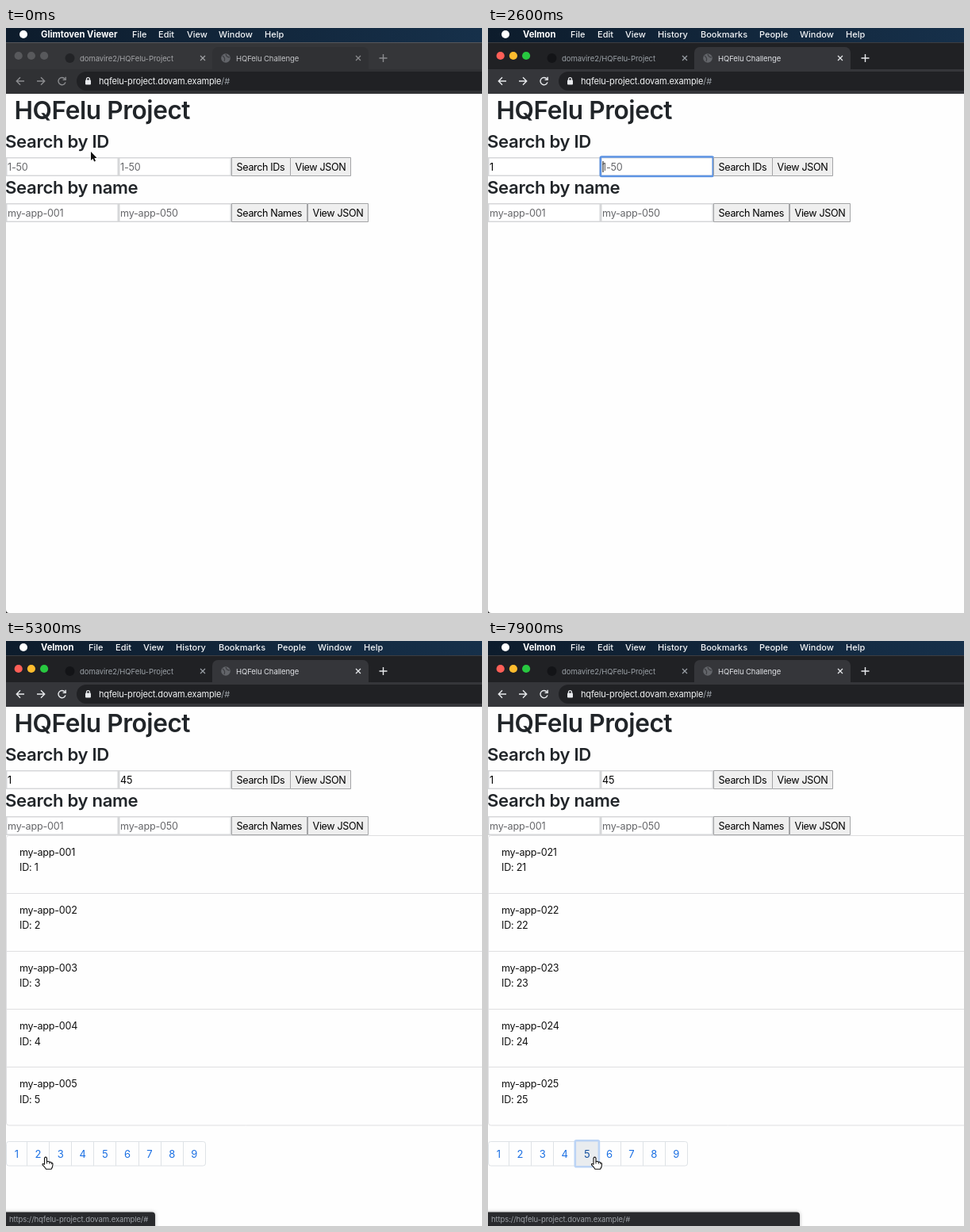
An HTML page with a canvas for the animation above (8 s loop, 600x738 px).

```html
<!DOCTYPE html>
<html lang="en">
<head>
<meta charset="utf-8">
<title>Search demo</title>
<style>
html, body { margin: 0; width: 100%; height: 100%; overflow: hidden; background: #fff; }
canvas { display: block; width: 600px; height: 738px; }
</style>
</head>
<body>
<canvas id="stage" width="600" height="738"></canvas>
<script>
const ctx = document.getElementById('stage').getContext('2d');
const LOOP = 8000, STEP = 100;
const HOST = 'hqfelu-project.dovam.example';

// [time, x, y, shape]; the shape holds until the next entry
const POINTER = [
  [0, 107, 156, 'arrow'], [100, 107, 156, 'arrow'], [300, 100, 191, 'arrow'],
  [500, 86, 177, 'beam'], [600, 85, 173, 'beam'], [1600, 85, 173, 'none'],
  [3300, 85, 173, 'beam'], [3600, 288, 177, 'hand'], [3800, 304, 180, 'hand'],
  [4000, 302, 178, 'hand'], [4300, 302, 178, 'hand'], [4400, 262, 240, 'arrow'],
  [4700, 35, 638, 'arrow'], [4900, 40, 645, 'arrow'], [5000, 42, 648, 'hand'],
  [5300, 50, 651, 'hand'], [6100, 50, 651, 'hand'], [6600, 85, 651, 'hand'],
  [6800, 85, 651, 'hand'], [7100, 104, 651, 'hand'], [7500, 104, 651, 'hand'],
  [7700, 142, 651, 'hand'], [7800, 134.5, 651, 'hand'], [LOOP, 134.5, 651, 'hand'],
];
const PAGES = [[4400, 1], [5600, 2], [6700, 3], [7300, 4], [7800, 5]];
const FIRST_VALUE = [[0, ''], [1600, '1']];
const SECOND_VALUE = [[0, ''], [3000, '4'], [3200, '45']];

const SHAPES = {
  arrow: new Path2D('M0 0V11L2.5 8.7L4.2 12.5L6 11.7L4.4 8H7.6Z'),
  beam: new Path2D('M-2.5-6Q0-6 0-4.5Q0-6 2.5-6M0-4.5V4.5M-2.5 6Q0 6 0 4.5Q0 6 2.5 6'),
  hand: new Path2D('M-1.5 1.2Q0-1 1.5 1.2V5.8Q4 5 4.8 6.4Q6.8 5.8 7.3 7.2Q9 7 9 9Q9 13 7 15.3H.5Q-1 12.5-4 9.8Q-4.4 7.6-1.5 9.3Z'),
  fingers: new Path2D('M1.5 5.8V8.5M4.8 6.4V8.8M7.3 7.2V9.2'),
};

const latest = (list, t) => list.reduce((value, [at, next]) => t >= at ? next : value, 0);

function rect(x, y, w, h, fill, radii = 0) {
  ctx.fillStyle = fill;
  ctx.beginPath();
  ctx.roundRect(x, y, w, h, radii);
  ctx.fill();
}

function frame(x, y, w, h, color, width = 1, radii = 0) {
  ctx.strokeStyle = color;
  ctx.lineWidth = width;
  ctx.beginPath();
  ctx.roundRect(x, y, w, h, radii);
  ctx.stroke();
}

function dot(x, y, r, fill) {
  ctx.fillStyle = fill;
  ctx.beginPath();
  ctx.arc(x, y, r, 0, Math.PI * 2);
  ctx.fill();
}

function stroke(path, color, width) {
  ctx.strokeStyle = color;
  ctx.lineWidth = width;
  ctx.stroke(typeof path === 'string' ? new Path2D(path) : path);
}

function text(str, x, y, size, color, { weight = 400, track = 0, align = 'left' } = {}) {
  ctx.font = `${weight} ${size}px Inter, Roboto, sans-serif`;
  ctx.letterSpacing = `${track * size}px`;
  ctx.textAlign = align;
  ctx.fillStyle = color;
  ctx.fillText(str, x, y);
  return ctx.measureText(str).width;
}

const body = (str, x, y, color = '#111', track = -.03) => text(str, x, y, 12.6, color, { track });
const heading = (str, x, y, size) => text(str, x, y, size, '#212529', { weight: 600, track: -.014 });

function menuBar(active) {
  const sky = ctx.createLinearGradient(0, 0, 600, 0);
  sky.addColorStop(0, '#0d1c2c');
  sky.addColorStop(1, '#16304a');
  rect(0, 0, 600, 18, sky);
  dot(22, 8, 5, '#fff');
  text(active ? 'Velmon' : 'Glimtoven Viewer', 44, 12, 11.2, '#fff', { weight: 700 });
  const items = active
    ? [['File', 104], ['Edit', 138], ['View', 173], ['History', 214], ['Bookmarks', 268],
       ['People', 342], ['Window', 393], ['Help', 451]]
    : [['File', 159], ['Edit', 192], ['View', 228], ['Window', 268], ['Help', 326]];
  for (const [label, x] of items) text(label, x, 12, 11, '#f4f6f8', { weight: 500 });
}

function browser(active) {
  const icon = active ? '#e8eaed' : '#8b8c8f';
  const dim = active ? '#9aa0a6' : '#a2a3a6';
  const toolbar = active ? '#35363a' : '#303134';
  rect(0, 18, 600, 34, active ? '#202124' : '#353639');
  rect(0, 18, 600, 1, active ? '#3c3d41' : '#56575b');
  rect(0, 52, 600, 31, toolbar);
  rect(260, 24, 197, 30, toolbar, [7, 7, 0, 0]);
  ['#ff5f57', '#febc2e', '#28c840'].forEach((c, i) => dot(15.7 + 16.2 * i, 35, 5.1, active ? c : '#58595c'));

  dot(80.5, 38, 6, active ? '#131417' : '#222326');
  text('domavire2/HQFelu-Project', 93, 41.5, 9.5, dim, { track: -.006 });
  dot(277, 38, 5.8, '#63656a');
  stroke('M273 35Q277 38 275 42M277 33Q278 37 282 37', '#3d3e42', 1.2);
  text('HQFelu Challenge', 290, 41.5, 9.5, active ? '#dfe1e5' : '#c3c4c7', { track: -.01 });
  stroke('M245 35l6 6m0-6l-6 6', dim, 1.2);
  stroke('M441 35l6 6m0-6l-6 6', icon, 1.2);
  stroke('M470.5 38h10M475.5 33v10', icon, 1.4);

  stroke('M23 67H13.5M18 62.3L13.3 67L18 71.7M39 67H48.5M44 62.3L48.7 67L44 71.7', icon, 1.4);
  stroke('M74.2 64.2A4.6 4.6 0 1 0 75 68.4M75.2 61.8V65.4H71.6', icon, 1.4);
  rect(89, 55, 530, 24, '#202124', 12);
  rect(100, 65.5, 7, 6, '#e8eaed', 1);
  stroke('M101.5 66V64.6A2 2 0 0 1 105.5 64.6V66', '#e8eaed', 1.2);
  const width = text(HOST, 117, 71, 11, '#f1f3f4', { track: -.014 });
  text('/#', 117 + width, 71, 11, '#9aa0a6');
}

function field(x, y, value, hint, focused, caret) {
  rect(x, y, 142, 24, '#fff');
  frame(x + .75, y + .75, 140.5, 22.5, '#d6d7d9', 1.5);
  if (focused) frame(x - .2, y - .5, 142, 24.5, '#5c93e3', 2.6, 1.5);
  body(value || hint, x + 2, y + 16.5, value ? '#000' : '#66676a', -.016);
  if (caret) {
    const offset = value ? ctx.measureText(value).width : 0;
    rect(x + 2.5 + offset, y + 5, 1, 14, '#111');
  }
}

function button(label, x, y, w) {
  rect(x, y, w, 24, '#efefef');
  frame(x + .5, y + .5, w - 1, 23, '#a3a4a6');
  body(label, x + 6.6, y + 16.5, '#000');
}

function form(t) {
  heading('HQFelu Project', 10.5, 114.5, 31.6);
  heading('Search by ID', -1, 150.5, 22.1);
  heading('Search by name', -1, 208.8, 22.1);
  const onFirst = t >= 1000 && t < 2200, onSecond = t >= 2200 && t < 4100;
  field(0, 163, latest(FIRST_VALUE, t) || '', '1-50', onFirst, onFirst && t < 2000);
  field(142, 163, latest(SECOND_VALUE, t) || '', '1-50', onSecond,
    t >= 2200 && t < 2700 || t >= 3000 && t < 3700);
  button('Search IDs', 284, 163, 75);
  button('View JSON', 358, 163, 77);
  field(0, 221, '', 'my-app-001');
  field(142, 221, '', 'my-app-050');
  button('Search Names', 284, 221, 96);
  button('View JSON', 380, 221, 77);
}

function results(page) {
  frame(.5, 245.5, 620, 365.5, '#dfdfe1', 1, 3);
  for (let i = 0; i < 5; i++) {
    const id = (page - 1) * 5 + i + 1, top = 245 + 73.1 * i;
    if (i) rect(0, Math.round(top), 600, 1, '#dfdfe1');
    body(`my-app-${String(id).padStart(3, '0')}`, 17, top + 25.6, '#111', -.02);
    body(`ID: ${id}`, 17, top + 45.2, '#111', -.02);
  }
}

function pagination(page) {
  const edge = i => i ? 26.5 + 28.1 * (i - 1) : .5;
  const digit = (i, color) =>
    text(i + 1, (edge(i) + edge(i + 1)) / 2, 651.7, 13, color, { align: 'center' });
  frame(.5, 631.5, 251, 30.5, '#dee2e6', 1, 3);
  for (let i = 0; i < 9; i++) {
    if (i) rect(Math.floor(edge(i)), 631, 1, 31, '#dee2e6');
    digit(i, '#1a6fe3');
  }
  if (page < 2) return;
  const i = page - 1, x = edge(i), w = edge(i + 1) - x;
  rect(x, 631.5, w, 30.5, '#e9ecef');
  frame(x - 1, 630.3, w + 2, 33, '#bcd4f5', 2.6, 1.5);
  digit(i, '#15509f');
}

function statusBubble(t) {
  const grow = Math.min(1, Math.max(0, (t - 5500) / 300));
  const width = 188 + 205 * grow * (2 - grow);
  ctx.save();
  ctx.shadowColor = 'rgba(0,0,0,.3)';
  ctx.shadowBlur = 4;
  rect(-6, 720.5, width + 6, 24, '#292a2d', 4);
  ctx.restore();
  text(`https://${HOST}/#`, 4, 733, 9.5, '#9da1a7', { track: -.01 });
}

function pointer(t) {
  const next = Math.max(1, POINTER.findIndex(([at]) => at > t));
  const [t0, x0, y0, shape] = POINTER[next - 1], [t1, x1, y1] = POINTER[next];
  if (shape === 'none') return;
  const p = (t - t0) / (t1 - t0);
  const path = SHAPES[shape];
  ctx.save();
  ctx.translate(x0 + (x1 - x0) * p, y0 + (y1 - y0) * p);
  ctx.lineJoin = 'round';
  if (shape === 'hand') {
    ctx.fillStyle = '#fff';
    ctx.fill(path);
    stroke(path, '#111', 1.1);
    stroke(SHAPES.fingers, '#111', .9);
  } else {
    stroke(path, '#fff', shape === 'beam' ? 2.6 : 1.8);
    ctx.fillStyle = '#111';
    if (shape === 'arrow') ctx.fill(path);
    else stroke(path, '#111', 1.2);
  }
  ctx.restore();
}

function draw(t) {
  const active = t >= 300, page = latest(PAGES, t);
  rect(0, 0, 600, 738, '#fefefe');
  menuBar(active);
  browser(active);
  form(t);
  if (page) {
    results(page);
    pagination(page);
  }
  if (t >= 5000) statusBubble(t);
  ctx.fillStyle = '#222';
  ctx.fill(new Path2D('M0 734Q0 738 4 738H0Z'));
  pointer(t);
}

const start = performance.now();
function tick() {
  const t = (performance.now() - start) % LOOP;
  draw(Math.floor(t / STEP) * STEP);
  requestAnimationFrame(tick);
}
tick();
</script>
</body>
</html>
```
